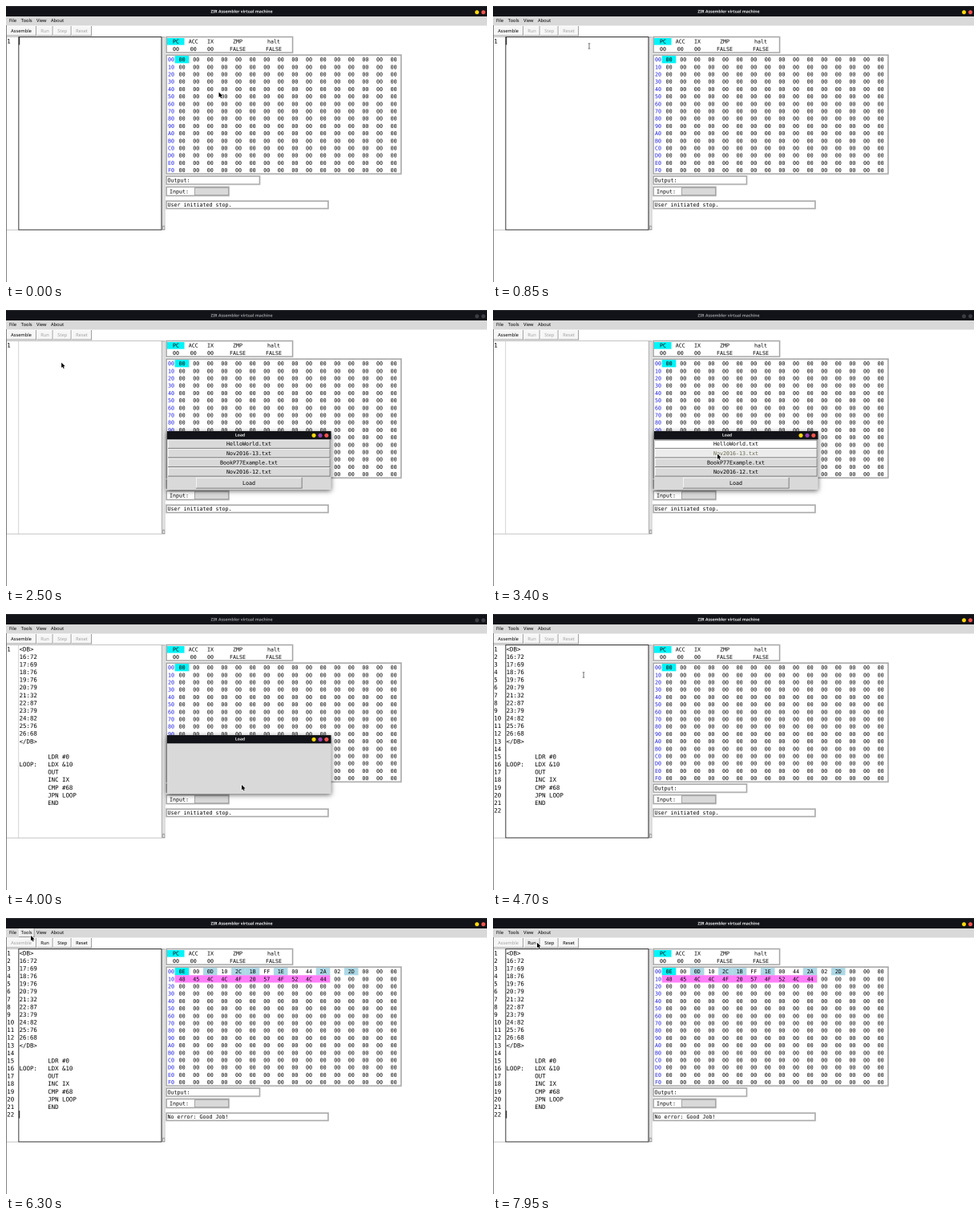
An HTML page with a canvas that plays this animation: 600 px wide and 344 px high, repeating every 8000 ms.

```html
<!DOCTYPE html>
<html lang="en">
<head>
<meta charset="utf-8">
<title>Assembler virtual machine</title>
<style>
html, body { margin: 0; width: 100%; height: 100%; overflow: hidden; background: #fff; }
canvas { display: block; width: 600px; height: 344px; }
</style>
</head>
<body>
<canvas id="stage"></canvas>
<script>
const stage = document.getElementById('stage');
// Drawn at double size and scaled down, so small glyphs stay soft
const scale = 2 * (window.devicePixelRatio || 1);
stage.width = 600 * scale;
stage.height = 344 * scale;
const ctx = stage.getContext('2d');
ctx.scale(scale, scale);

const LOOP = 8000;
const SANS = '"Noto Sans", "Open Sans", sans-serif';
const MONO = '"DejaVu Sans Mono", monospace';
const GREY = '#d9d9d9', CYAN = '#00f4f8', BLUE = '#add8e6', PINK = '#ff7ef8';

const program = [
  '<DB>', '16:72', '17:69', '18:76', '19:76', '20:79', '21:32', '22:87',
  '23:79', '24:82', '25:76', '26:68', '</DB>', '',
  '        LDR #0', 'LOOP:   LDX &10', '        OUT', '        INC IX',
  '        CMP #68', '        JPN LOOP', '        END'
];
const opcodes = '0E 00 0D 10 2C 1B FF 1E 00 44 2A 02 2D'.split(' ');
const opcodeCols = [2, 4, 5, 7, 10, 12];
const letters = [...'HELLO WORLD'].map(c => c.charCodeAt(0).toString(16).toUpperCase());
const files = ['HelloWorld.txt', 'Nov2016-13.txt', 'BookP77Example.txt', 'Nov2016-12.txt'];

// Pointer path: time, x, y
const path = [
  [0, 265.5, 107.5], [50, 265.5, 107.5], [450, 205, 78], [850, 120, 50], [1200, 10, 18],
  [1350, 9, 18], [1500, 9, 18], [1750, 10.5, 35.5], [2300, 10.5, 37], [2750, 150, 105],
  [3100, 278, 166], [3250, 278, 166], [3400, 280, 179.5], [3550, 294, 213],
  [4300, 294, 213], [4580, 215, 150], [4700, 113, 76], [4800, 108, 72], [4950, 105, 74],
  [5300, 22, 30], [5850, 22, 30], [6000, 22, 30], [6130, 42, 21], [6300, 31, 22],
  [6800, 29, 22], [6900, 28.5, 22], [7150, 28.5, 22], [7500, 22, 29], [7900, 55, 30.8],
  [8000, 55, 30.8]
];

function pointerAt(t) {
  const i = path.findIndex(p => p[0] > t);
  const [t0, x0, y0] = path[i - 1], [t1, x1, y1] = path[i];
  const k = (t - t0) / (t1 - t0), e = k * k * (3 - 2 * k);
  return [x0 + (x1 - x0) * e, y0 + (y1 - y0) * e];
}

function rect(x, y, w, h, fill) {
  ctx.fillStyle = fill;
  ctx.fillRect(x, y, w, h);
}

function frame(x, y, w, h, color, line = 1) {
  ctx.strokeStyle = color;
  ctx.lineWidth = line;
  ctx.strokeRect(x + line / 2, y + line / 2, w - line, h - line);
}

// y is the middle of the capital letters
function text(s, x, y, { size = 6.65, font = MONO, color = '#000', align = 'left', weight = 400 } = {}) {
  ctx.font = `${weight} ${size}px ${font}`;
  ctx.textRendering = 'geometricPrecision';
  ctx.textAlign = align;
  ctx.fillStyle = color;
  ctx.fillText(s, x, y + size * 0.34);
}
const label = (s, x, y, color, align) => text(s, x, y, { size: 5.7, font: SANS, color, align });
const title = (s, x, y, color) => text(s, x, y, { size: 5.05, font: SANS, weight: 700, color, align: 'center' });
const mid = (s, x, y, color) => text(s, x, y, { color, align: 'center' });

function dot(x, y, r, color) {
  ctx.fillStyle = color;
  ctx.beginPath();
  ctx.arc(x, y, r, 0, 7);
  ctx.fill();
}

function panel(x, y, w, h) {
  rect(x, y, w, h, '#fff');
  frame(x, y, w, h, '#cfcfcf', 2);
  frame(x + 0.8, y + 0.8, w - 1.6, h - 1.6, '#999', 0.8);
}

function button(x, y, w, h, fill, edge = '#8c8c8c') {
  rect(x, y, w, h, fill);
  rect(x, y, w, 0.7, '#fff');
  rect(x, y, 0.7, h, '#fff');
  rect(x, y + h - 0.8, w, 0.8, edge);
  rect(x + w - 0.8, y, 0.8, h, edge);
}

const inside = ([px, py], x, y, w, h) => px >= x && px < x + w && py >= y && py < y + h;

function bars(s) {
  rect(0, 0, 600, 13, '#121318');
  rect(0, 0, 600, 1, '#2a2c30');
  title('ZIR Assembler virtual machine', 294, 7, s.dialog ? '#9a9c9f' : '#f0f0f0');
  dot(587.5, 7.8, 2.5, s.dialog ? '#3c3d43' : '#fdd808');
  dot(595.5, 7.8, 2.5, s.dialog ? '#3c3d43' : '#f5544d');

  rect(0, 13, 600, 11.5, GREY);
  [['File', 4, 1, 15], ['Tools', 18.8, 16, 19.5], ['View', 38, 36, 16], ['About', 56, 53, 21]]
    .forEach(([name, x, left, w], i) => {
      if (inside(s.mouse, left, 13, w, 11) || (i === 0 && s.menu)) button(left, 13.2, w, 10.8, '#ececec');
      label(name, x, 18.3);
    });

  [['Assemble', 0, 38], ['Run', 38.5, 20], ['Step', 59, 22.5], ['Reset', 82, 25]]
    .forEach(([name, x, w], i) => {
      const enabled = (i === 0) !== s.assembled;
      const hover = enabled && !s.menu && inside(s.mouse, x, 25, w, 12);
      button(x, 25, w, 12.3, hover ? '#ececec' : '#f6f6f6');
      label(name, x + w / 2, 31.2, enabled ? '#000' : '#a3a3a3', 'center');
    });
}

function editor(s) {
  const code = { size: 7.4 };
  const row = i => 43.8 + i * 9.58;
  frame(0, 38, 198.5, 241.5, '#b5b5b5', 0.8);
  for (let i = 0; i < (s.numbered ? 22 : 1); i++) text(i + 1, 1.3, row(i), code);
  if (s.loaded) program.forEach((line, i) => text(line, 16.6, row(i), code));
  rect(194.5, 38, 4, 241.5, '#c0c0c0');
  rect(195.2, 39.5, 2.6, 234, '#e2e2e2');
  rect(195.2, 275, 2.6, 3.4, '#eee');
  frame(195, 274.5, 3.2, 4.4, '#8c8c8c', 0.7);
  if (s.focus) {
    frame(15.4, 38.2, 179, 241.2, '#222', 0.9);
    if (s.caret) rect(16.4, row(s.loaded ? 21 : 0) - 4.8, 0.8, 9.4, '#000');
  } else {
    rect(15.4, 38, 0.7, 241, '#c4c4c4');
    rect(193.8, 38, 0.7, 241, '#b5b5b5');
  }
}

function machine(s) {
  panel(199, 37.5, 159.6, 21.7);
  rect(201, 40, 21.5, 8.6, CYAN);
  [['PC', '00', 212], ['ACC', '00', 233.8], ['IX', '00', 255], ['ZMP', 'FALSE', 289], ['halt', 'FALSE', 334]]
    .forEach(([name, value, x]) => { mid(name, x, 44.2); mid(value, x, 53.6); });

  panel(199, 60, 295, 150.3);
  const cell = (r, c, n, fill) => rect(210.7 + c * 17.6, 62.1 + r * 9.2, 17.6 * n, 9.2, fill);
  cell(0, 0, 1, CYAN);
  if (s.assembled) {
    opcodeCols.forEach(c => cell(0, c, 1, BLUE));
    cell(1, 0, letters.length, PINK);
  }
  const memory = s.assembled ? [opcodes, letters] : [];
  for (let r = 0; r < 16; r++) {
    const y = 66.8 + r * 9.2;
    mid(r.toString(16).toUpperCase() + '0', 206, y, '#2020e8');
    for (let c = 0; c < 16; c++) mid(memory[r]?.[c] ?? '00', 219.6 + c * 17.6, y);
  }

  panel(199, 211, 118.5, 12.3);
  text('Output:', 201.5, 217.3);
  panel(199, 224.5, 80, 13);
  text('Input:', 204, 231);
  rect(235, 226.3, 43, 9.8, GREY);
  frame(235, 226.3, 43, 9.8, '#999', 0.8);
  panel(199, 242, 204, 11.5);
  text(s.assembled ? 'No error: Good Job!' : 'User initiated stop.', 201.5, 247.8);
}

function fileMenu(s) {
  button(0.5, 24, 21.5, 19.3, GREY);
  if (s.mouse[1] > 24) button(1.5, s.mouse[1] < 33.5 ? 25 : 33.5, 19.5, 9, '#ececec');
  label('Save', 3, 29.3);
  label('Load', 3, 38.3);
}

function dialog(s) {
  ctx.save();
  ctx.globalAlpha = s.dialog;
  ctx.shadowColor = 'rgba(0,0,0,.6)';
  ctx.shadowBlur = 6 * scale;
  ctx.shadowOffsetY = 1.5 * scale;
  rect(201, 151, 204.5, 73, GREY);
  ctx.shadowColor = 'transparent';
  rect(201, 151, 204.5, 10.3, '#121318');
  title('Load', 292, 156, '#f0f0f0');
  [['#fdd808', 384], ['#9a3fb5', 392], ['#f5544d', 399.8]].forEach(([c, x]) => dot(x, 156.3, 2.6, c));
  if (!s.loaded) {
    files.forEach((name, i) => {
      const y = 161.7 + i * 11.6, hover = inside(s.mouse, 202, y, 203, 11);
      const picked = i === 0 && s.picked;
      button(202, y, 202.5, 11, picked ? '#fff' : hover ? '#ececec' : GREY, '#666');
      if (picked) rect(202, y, 202.5, 0.8, '#666');
      mid(name, 303, y + 5.2, hover && !picked ? '#66664c' : '#000');
    });
    button(237, 208.8, 132.5, 13.7, inside(s.mouse, 237, 209, 132, 13) ? '#ececec' : GREY, '#666');
    mid('Load', 303, 215.7);
  }
  ctx.restore();
}

function polygon(points) {
  ctx.beginPath();
  points.forEach(([x, y]) => ctx.lineTo(x, y));
  ctx.closePath();
}

function pointer(s) {
  const [x, y] = s.mouse;
  if (!s.dialog && inside(s.mouse, 16, 38, 178, 241)) {
    rect(x - 0.35, y - 3.2, 0.7, 6.2, '#333');
    rect(x - 1.3, y - 3.5, 2.6, 0.6, '#333');
    rect(x - 1.3, y + 2.8, 2.6, 0.6, '#333');
    return;
  }
  polygon([[0, 0], [0, 6.3], [1.5, 5.1], [2.5, 7.4], [3.6, 6.9], [2.6, 4.7], [4.6, 4.5]]
    .map(([a, b]) => [x + a, y + b]));
  ctx.strokeStyle = '#fff';
  ctx.lineWidth = 0.9;
  ctx.stroke();
  ctx.fillStyle = '#000';
  ctx.fill();
}

const clamp = v => Math.max(0, Math.min(1, v));

function draw(t) {
  const s = {
    mouse: pointerAt(t),
    menu: t >= 1300 && t < 1950,
    dialog: clamp((t - 2000) / 200) * clamp((4550 - t) / 150),
    picked: t >= 3150,
    loaded: t >= 3800,
    numbered: t >= 4450,
    focus: t < 1300 || t >= 4500,
    caret: (t + 450) % 900 < 600,
    assembled: t >= 5500
  };
  rect(0, 0, 600, 344, '#fff');
  bars(s);
  editor(s);
  machine(s);
  rect(0, 24, 0.8, 320, '#666');
  if (s.menu) fileMenu(s);
  if (s.dialog) dialog(s);
  pointer(s);
}

function tick() {
  draw(performance.now() % LOOP);
  requestAnimationFrame(tick);
}
tick();
</script>
</body>
</html>
```
